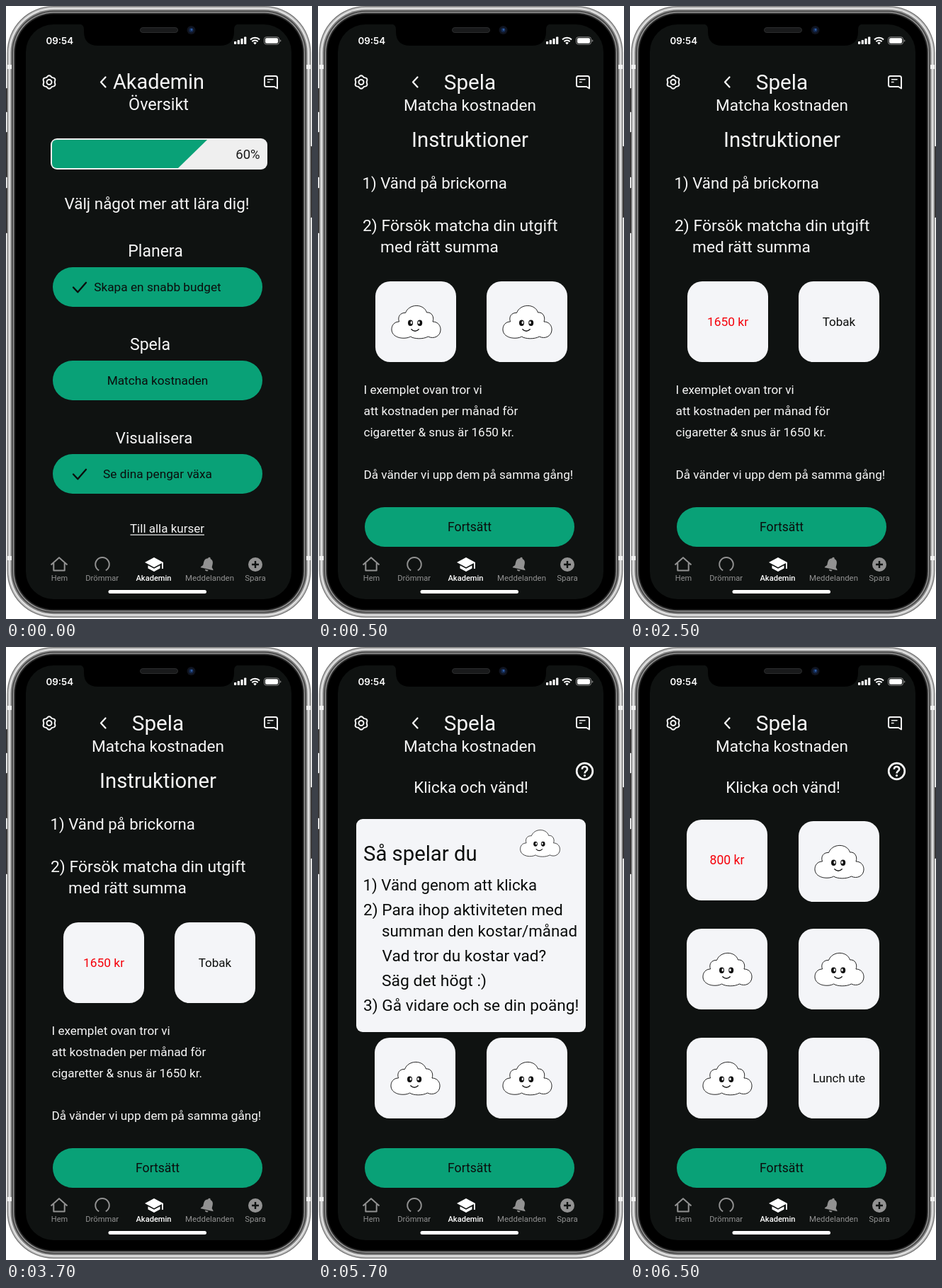
An HTML page that plays this animation: 432 by 866 pixels, repeating every 8 s.

```html
<!DOCTYPE html>
<html lang="sv">
<head>
<meta charset="utf-8">
<title>Akademin</title>
<style>
html, body { margin: 0; width: 100%; height: 100%; overflow: hidden; background: #fff; }
svg { display: block; width: 100%; height: 100%; }
text { font-family: Roboto, Inter, sans-serif; white-space: pre; }
.line { fill: none; stroke: #f6f6f6; stroke-width: 2; stroke-linecap: round; stroke-linejoin: round; }
.dim { fill: none; stroke: #929292; stroke-width: 2; stroke-linejoin: round; }
</style>
</head>
<body>
<svg viewBox="0 0 432 866" preserveAspectRatio="xMidYMid meet">
  <defs>
    <g id="cloud">
      <path d="M-15-13C-10-26.400 11-26.400 15-13.500C22-14.500 26-7 23.500-.5C31-.5 35 5.500 34.500 11.500C34 20 25 24.500 17 20.500C10 24.500-3 24-8 20.500C-14 24.500-33 24-34.500 11.500C-35 5-31-.5-24-.5C-26.500-8-22-13.500-15-13Z"
        fill="#fff" stroke="#222" stroke-linejoin="round"/>
      <ellipse cx="-8" cy="1.200" rx="3.500" ry="4.200" fill="#111"/>
      <ellipse cx="5.200" cy="1.200" rx="3.500" ry="4.200" fill="#111"/>
      <ellipse cx="-6.700" cy=".7" rx="1.200" ry="2" fill="#fff"/>
      <ellipse cx="4" cy=".7" rx="1.200" ry="2" fill="#fff"/>
      <path d="M-6.700 10.200Q-1.500 15.200 3.800 10.200" fill="none" stroke="#111" stroke-width="1.300" stroke-linecap="round"/>
    </g>
  </defs>

  <g id="phone">
    <g fill="#2c2a2a">
      <rect y="116" width="4" height="34" rx="1"/>
      <rect y="178" width="4" height="64" rx="1"/>
      <rect y="257" width="4" height="64" rx="1"/>
      <rect x="428" y="198" width="4" height="101" rx="1"/>
    </g>
    <g id="rim"></g>
    <g fill="#f1f1f1">
      <rect x="2" y="83" width="6" height="6"/><rect x="424" y="83" width="6" height="6"/>
      <rect x="2" y="777" width="6" height="6"/><rect x="424" y="777" width="6" height="6"/>
    </g>
    <rect x="28" y="26" width="375" height="812" rx="39" fill="#0f1211"/>
    <path d="M103 25Q110 26 110 33V36Q110 56 130 56H302Q322 56 322 36V33Q322 26 329 25Z" fill="#000"/>
    <rect x="189.500" y="30.500" width="53" height="7" rx="3.500" fill="#191a1b" stroke="#2b2c2d"/>
    <circle cx="261.500" cy="34" r="6" fill="#10141f"/>
    <circle cx="261.500" cy="34" r="3.200" fill="#14294f"/>
    <circle cx="262" cy="33.500" r="1.400" fill="#2f5da5"/>
  </g>

  <g id="status" fill="#fff">
    <rect x="322" y="50" width="3.200" height="4" rx=".8"/>
    <rect x="326.700" y="48" width="3.200" height="6" rx=".8"/>
    <rect x="331.400" y="46" width="3.200" height="8" rx=".8"/>
    <rect x="336.100" y="43.500" width="3.200" height="10.500" rx=".8"/>
    <g fill="none" stroke="#fff" stroke-width="2.100">
      <path d="M345 47.400A9.300 9.300 0 0 1 358 47.400"/>
      <path d="M347.400 50.200A5.900 5.900 0 0 1 355.600 50.200"/>
    </g>
    <path d="M349.200 52A3.400 3.400 0 0 1 353.800 52L351.500 54.500Z"/>
    <rect x="364.500" y="43.800" width="21" height="10.400" rx="3" fill="none" stroke="#8c8c8c"/>
    <rect x="366" y="45.300" width="18" height="7.400" rx="1.800"/>
    <path d="M386.800 47.200q1.600 .4 1.600 1.800t-1.600 1.800z" fill="#8c8c8c"/>
  </g>

  <g id="header" class="line">
    <path id="gear"/>
    <circle cx="61" cy="107.500" r="3.500"/>
    <path d="M140.500 100.500L134 107.500L140.500 114.500" stroke-width="2.300"/>
    <path d="M367.500 99H380.500Q383 99 383 101.500V116.500L379 114H367.500Q365 114 365 111.500V101.500Q365 99 367.500 99Z"/>
    <path d="M369.500 103.800H377M369.500 107.500H372" stroke-width="1.600"/>
  </g>

  <g id="nav">
    <path class="dim" d="M63.500 789.500L75 779.300L86.500 789.500M67.300 787V797.500H82.700V787"/>
    <path class="dim" d="M131.200 797.400A9.800 9.800 0 1 1 140.800 797.400"/>
    <g fill="#fff">
      <path d="M209 779L222 786L209 793L196 786Z"/>
      <path d="M200.500 790.200V794.600L209 799L217.500 794.600V790.200L209 794.800Z"/>
      <rect x="220" y="786" width="1.900" height="9"/>
    </g>
    <g fill="#929292" transform="rotate(13 285 789)">
      <path d="M285 778.500q1.800 0 1.800 2c3.400 .9 4.600 3.400 4.600 6.500v4.600l2.600 2.800v1h-18v-1l2.600-2.800v-4.600c0-3.100 1.200-5.600 4.600-6.500q0-2 1.800-2z"/>
      <path d="M282.600 796.600h4.800q-.4 2-2.400 2t-2.400-2z"/>
    </g>
    <circle cx="352" cy="789" r="10" fill="#929292"/>
    <path d="M352 784V794M347 789H357" stroke="#0f1211" stroke-width="2.400"/>
    <rect x="144.500" y="825" width="138.500" height="5" rx="2.500" fill="#fff"/>
  </g>
  <g id="labels"></g>
  <g id="screen"></g>
</svg>
<script>
const WHITE = '#f6f6f6', INK = '#0b0d0c', GREEN = '#09a177', CARD = '#f4f5f8', RED = '#f5000a', GREY = '#929292';
const LOOP = 8000;

const byId = id => document.getElementById(id);
const text = (s, x, y, size, fill = WHITE, anchor = 'start', extra = '') =>
  `<text x="${x}" y="${y}" font-size="${size}" fill="${fill}" text-anchor="${anchor}" ${extra}>${s.replace('&', '&amp;')}</text>`;
const mid = (s, x, y, size, fill, extra) => text(s, x, y, size, fill, 'middle', extra);
const box = (x, y, w, h, r, fill) =>
  `<rect x="${x}" y="${y}" width="${w}" height="${h}" rx="${r}" fill="${fill}"/>`;
const button = (label, y, size = 17.25) =>
  box(66, y, 296, 56, 28, GREEN) + mid(label, 214, y + 34, size, INK);
const check = y =>
  `<path d="M95 ${y}l6.3 6.8l11.7-13.5" fill="none" stroke="${INK}" stroke-width="2.3" stroke-linecap="round" stroke-linejoin="round"/>`;
const cloud = (x, y, k = 1) => `<use href="#cloud" transform="translate(${x} ${y}) scale(${k})"/>`;
const blank = (x, y) => box(x, y, 114, 114, 21, CARD);
const hidden = (x, y) => blank(x, y) + cloud(x + 57.5, y + 57.5);
const shown = (x, y, label, size, fill = INK) => blank(x, y) + mid(label, x + 57, y + 63, size, fill);

const overview = () =>
  mid('Akademin', 215.5, 117, 28.9) +
  mid('Översikt', 215.5, 147, 23.4) +
  box(63, 187, 306, 44, 9, '#efefef') +
  `<path d="M72 189H284L243 229H72Q65 229 65 222V196Q65 189 72 189Z" fill="${GREEN}"/>` +
  mid('60%', 341.5, 216, 18.5, '#1b1b1b') +
  mid('Välj något mer att lära dig!', 213, 287, 22.4) +
  mid('Planera', 211, 354, 23) +
  button('Skapa en snabb budget', 369) + check(397.5) +
  mid('Spela', 203.5, 486, 23.1) +
  button('Matcha kostnaden', 501) +
  mid('Visualisera', 209, 618, 22.2) +
  button('Se dina pengar växa', 633) + check(661.5) +
  mid('Till alla kurser', 227.5, 744, 17) +
  box(175.5, 746.5, 104.5, 1.2, 0, WHITE);

const gameHead = () =>
  mid('Spela', 214.5, 118, 29.7) +
  mid('Matcha kostnaden', 214.5, 148, 22.6) +
  button('Fortsätt', 708, 17.6);

const rules = cards => gameHead() +
  mid('Instruktioner', 214.5, 198.5, 29.3) +
  text('1) Vänd på brickorna', 62.5, 258, 22.2) +
  text('2) Försök matcha din utgift', 63, 318, 22.9) +
  text('med rätt summa', 88, 348, 22.7) +
  cards +
  text('I exemplet ovan tror vi', 64.5, 548, 17.1) +
  text('att kostnaden per månad för', 64.5, 578, 17.25) +
  text('cigaretter & snus är 1650 kr.', 64.5, 608, 17.1) +
  text('Då vänder vi upp dem på samma gång!', 64.5, 668, 17.15);

const playHead = () => gameHead() +
  mid('Klicka och vänd!', 216, 206, 22.4) +
  `<circle cx="376.5" cy="175.5" r="11.3" fill="none" stroke="${WHITE}" stroke-width="2.7"/>
   <path d="M372.8 172.7q.2-3.7 3.7-3.7t3.7 3.4c0 2.8-3.7 3-3.7 6" fill="none" stroke="${WHITE}" stroke-width="2.6"/>
   <circle cx="376.5" cy="181.6" r="1.6" fill="${WHITE}"/>`;

const guide = () => playHead() +
  hidden(80, 552) + hidden(238, 552) +
  box(54, 243, 324, 301, 9, CARD) +
  cloud(313.5, 277.3, .81) +
  [['Så spelar du', 64, 302, 29.3],
   ['1) Vänd genom att klicka', 63.5, 344, 22.25],
   ['2) Para ihop aktiviteten med', 64, 379, 22.65],
   ['summan den kostar/månad', 90, 409, 22.35],
   ['Vad tror du kostar vad?', 90.5, 444, 22.6],
   ['Säg det högt :)', 90, 479, 22.9],
   ['3) Gå vidare och se din poäng!', 64, 514, 22.7]]
    .map(row => text(...row, INK)).join('');

const board = () => playHead() +
  shown(80, 244, '800 kr', 17.6, RED) + hidden(238, 246) +
  hidden(80, 398) + hidden(238, 398) +
  hidden(80, 552) + shown(238, 552, 'Lunch ute', 17);

const scenes = [
  [0, overview()],
  [500, rules(hidden(81, 389) + hidden(238, 389))],
  [2500, rules(shown(81, 389, '1650 kr', 17.4, RED) + shown(238, 389, 'Tobak', 17))],
  [4500, guide()],
  [6500, board()]
];

// Nested rings of the metal frame: inset and shade.
byId('rim').innerHTML = [
  [0, '#777'], [1.3, '#c4c4c4'], [3, '#e6e6e6'], [4.8, '#8c8c8c'],
  [6.5, '#4c4c4c'], [8.5, '#a0a0a0'], [9.7, '#2a2a2a'], [11.5, '#000']
].map(([d, fill]) => box(1.5 + d, d, 429 - 2 * d, 864 - 2 * d, 66 - d, fill)).join('');

// Six soft teeth around the hub.
byId('gear').setAttribute('d', 'M' + Array.from({ length: 60 }, (_, i) => {
  const a = i * Math.PI / 30, r = 8.5 + .8 * Math.cos(6 * a);
  return (61 + r * Math.sin(a)).toFixed(2) + ' ' + (107.5 - r * Math.cos(a)).toFixed(2);
}).join('L') + 'Z');

byId('labels').innerHTML =
  text('09:54', 56.5, 54, 13.3, '#fff', 'start', 'style="font-family:Inter,sans-serif;font-weight:600"') +
  mid('Hem', 75.5, 812, 11, GREY) +
  mid('Drömmar', 135.7, 812, 11.2, GREY) +
  mid('Akademin', 208.5, 812, 11.1, '#fff', 'font-weight="500"') +
  mid('Meddelanden', 287.5, 812, 11.4, GREY) +
  mid('Spara', 352, 812, 11.5, GREY);

const screenEl = byId('screen');
let current = null;

function draw(t) {
  const scene = scenes.filter(([start]) => start <= t).pop();
  if (scene === current) return;
  current = scene;
  screenEl.innerHTML = scene[1];
}

const begin = performance.now();
function tick() {
  draw((performance.now() - begin) % LOOP);
  requestAnimationFrame(tick);
}
tick();
</script>
</body>
</html>
```
